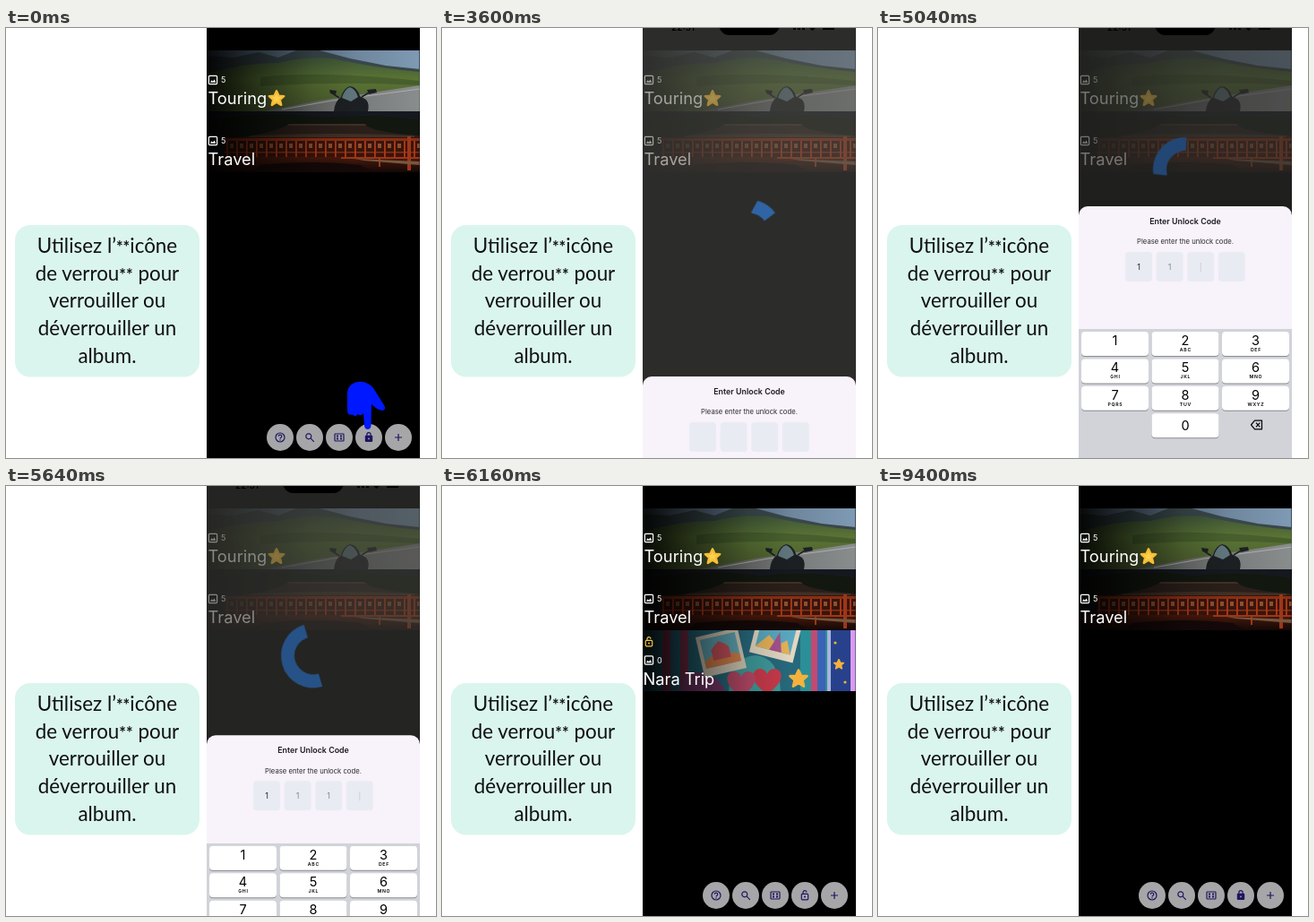
These frames come from a looping animation (480x480 px, 9880 ms). An HTML page:

```html
<!DOCTYPE html>
<html lang="fr">
<head>
<meta charset="utf-8">
<title>Verrouiller un album</title>
<style>
  html, body { margin: 0; width: 100%; height: 100%; overflow: hidden; background: #fff; }
  svg { display: block; width: 100%; height: 100%; }
  .say { font: 22.4px Lato, "Noto Sans", sans-serif; text-anchor: middle; fill: #111; }
  .say .stars { font-size: 18px; font-weight: 700; }
  .label { font: 18.3px Inter, sans-serif; fill: #fff; }
  .count { font: 9px Inter, sans-serif; fill: #fff; }
  .mid { text-anchor: middle; }
  .title { font: 600 8.9px Inter, sans-serif; fill: #1c1b20; }
  .hint { font: 7.7px Inter, sans-serif; fill: #2b2a30; }
  .digit { font: 9px Inter, sans-serif; }
  .num { font: 14.5px Inter, sans-serif; }
  .abc { font: 600 5.2px Inter, sans-serif; letter-spacing: .7px; }
  .clock { font: 600 10px Inter, sans-serif; }
  .line { fill: none; stroke: currentColor; stroke-width: 1.2; stroke-linejoin: round; }
  #hand { transform-origin: 402px 422px; }
  #nara, #loading, #barrier { opacity: 0; }
</style>
</head>
<body>
<svg viewBox="0 0 480 480">
  <defs>
    <clipPath id="screen"><path d="M224 0h238v480h-238z"/></clipPath>
    <clipPath id="strip"><path d="M0 0h237.5v68h-237.5z"/></clipPath>
    <linearGradient id="shade">
      <stop offset="0" stop-color="#000" stop-opacity=".92"/>
      <stop offset=".2" stop-color="#000" stop-opacity=".6"/>
      <stop offset=".5" stop-color="#000" stop-opacity=".15"/>
      <stop offset=".7" stop-color="#000" stop-opacity="0"/>
    </linearGradient>
    <linearGradient id="sky">
      <stop offset=".3" stop-color="#586c7e"/><stop offset="1" stop-color="#7f9ab4"/>
    </linearGradient>
    <linearGradient id="field" x2="0" y2="1">
      <stop offset="0" stop-color="#3f5638"/><stop offset=".4" stop-color="#5a7434"/><stop offset="1" stop-color="#4a5a2e"/>
    </linearGradient>
    <linearGradient id="road">
      <stop offset="0" stop-color="#5d605d"/><stop offset="1" stop-color="#8a8d8e"/>
    </linearGradient>
    <linearGradient id="water" x2="0" y2="1">
      <stop offset="0" stop-color="#4a1a0c"/><stop offset="1" stop-color="#120807"/>
    </linearGradient>
    <pattern id="posts" width="11" height="24" y="28" patternUnits="userSpaceOnUse">
      <path fill="#3a140b" d="M0 0h11v24h-11z"/>
      <path fill="#8a2f16" d="M0 2h11v3h-11zM0 17h11v1.5h-11z"/>
      <path fill="#ad3a18" d="M0 5h1.8v19h-1.8z"/>
      <path fill="#8c5130" d="M4 8h4v5h-4z"/>
    </pattern>
    <path id="star" d="M0 -8.2L2.5 -2.8L8.2 -2.4L3.8 1.6L5.2 7.4L0 4.3L-5.2 7.4L-3.8 1.6L-8.2 -2.4L-2.5 -2.8Z" stroke-width="2.4" stroke-linejoin="round"/>
    <path id="heart" d="M0 14C-22 0 -17 -14 -8 -14C-3 -14 0 -10 0 -7C0 -10 3 -14 8 -14C17 -14 22 0 0 14Z"/>
    <g id="photos" color="#fff">
      <rect class="line" x="-4.6" y="-4.6" width="9.2" height="9.2" rx="1"/>
      <path fill="currentColor" d="M-3.2 2.8L-1.3 .2L0 1.7L1.5 -.6L3.3 2.8Z"/>
    </g>
    <g id="unlocked">
      <rect class="line" x="-3.7" y="-1.6" width="7.4" height="6.4" rx="1"/>
      <path class="line" d="M-2 -1.8V-3.2A2 2 0 0 1 2 -3.4"/>
      <circle cy="1.6" r="1" fill="currentColor"/>
    </g>
    <g id="locked">
      <rect fill="currentColor" x="-4.2" y="-2.2" width="8.4" height="7.1" rx="1"/>
      <path class="line" d="M-2.1 -2V-3.3A2.1 2.1 0 0 1 2.1 -3.3V-2"/>
      <circle cy="1.4" r=".9" fill="#a6a6a8"/>
    </g>
  </defs>

  <rect x="10" y="220" width="206" height="169.5" rx="17" fill="#daf5ed"/>
  <g class="say">
    <text x="113" y="250.8">Utilisez l’<tspan class="stars">**</tspan>icône</text>
    <text x="113" y="281.6">de verrou<tspan class="stars">**</tspan> pour</text>
    <text x="113" y="312.3">verrouiller ou</text>
    <text x="113" y="343">déverrouiller un</text>
    <text x="113" y="373.7">album.</text>
  </g>

  <g clip-path="url(#screen)">
    <path d="M224 0h238v480h-238z"/>

    <g transform="translate(224 25)">
      <g clip-path="url(#strip)">
        <path fill="url(#sky)" d="M0 0h238v68h-238z"/>
        <path fill="#39474a" d="M0 6L30 8L58 2L80 8L100 0H126L160 9L200 17L238 21V40H0Z"/>
        <path fill="url(#field)" d="M0 26Q40 14 80 14Q112 6 140 9Q190 20 238 24V68H0Z"/>
        <path fill="#3c5229" d="M60 30Q120 22 238 34V39Q150 34 60 40Z" opacity=".6"/>
        <path fill="url(#road)" d="M62 68L126 56L238 39V68Z"/>
        <path stroke="#b9bab5" stroke-width=".8" fill="none" d="M84 66L140 56L238 43"/>
        <path fill="#1d2022" d="M142 68Q143 57 150 52Q153 42 160 40Q168 41 171 51L178 55Q182 60 180 68Z"/>
        <path fill="#60757d" d="M151 53Q154 43 160 41Q166 43 169 52L161 57Z"/>
        <path fill="none" stroke="#1d2022" stroke-width="1.6" d="M148 53L139 47M173 52L183 46"/>
        <path fill="#1d2022" d="M137 44l8 1l-1 4l-6 -1zM179 44l10 -1l1 4l-9 2z"/>
        <path fill="url(#shade)" d="M0 0h238v68h-238z"/>
      </g>
      <use href="#photos" x="7" y="33"/>
      <text class="count" x="16" y="36.3">5</text>
      <text class="label" x="1.5" y="60">Touring</text>
      <use href="#star" x="78" y="53.5" fill="#fdd04f" stroke="#f9bd35"/>
    </g>

    <g transform="translate(224 93)">
      <g clip-path="url(#strip)">
        <path fill="#15191f" d="M0 0h238v68h-238z"/>
        <path fill="#12170f" d="M0 10Q70 -2 130 7Q190 2 238 10V40H0Z"/>
        <path fill="#2a1f1a" d="M36 29Q70 25 92 15H176Q190 24 238 27V32H36Z"/>
        <path fill="#403025" d="M92 14h84l3 2h-90zM50 27Q140 23 232 27V29H46Z"/>
        <path fill="url(#posts)" d="M20 29H238V51H20Z"/>
        <path fill="url(#water)" d="M0 51H238V68H0Z"/>
        <path fill="#9c3717" d="M150 51H238V53H150ZM224 28h4v38h-4zM192 53h2v9h-2z"/>
        <path fill="#77573f" d="M165 53L238 56V60L176 55Z"/>
        <path fill="#140908" d="M60 60Q120 54 172 60L186 68H50Z"/>
        <path fill="url(#shade)" d="M0 0h238v68h-238z"/>
      </g>
      <use href="#photos" x="7" y="33"/>
      <text class="count" x="16" y="36.3">5</text>
      <text class="label" x="1.5" y="60">Travel</text>
    </g>

    <g id="nara"><g transform="translate(224 161)">
      <g clip-path="url(#strip)">
        <path fill="#27697c" d="M0 0h238v68h-238z"/>
        <path fill="#8a3350" d="M22 0h9v68h-9zM42 0h9v68h-9z"/>
        <path fill="#3f9a9b" d="M96 68Q98 30 126 28Q152 30 154 68Z"/>
        <path fill="#7a3a6c" d="M40 68Q46 42 68 48Q86 52 92 68Z"/>
        <path fill="#2b8f98" d="M176 0h34v68h-34z"/>
        <path fill="#c24a72" d="M188 0h7v68h-7z"/>
        <path fill="#3a63b5" d="M195 0h9v68h-9z"/>
        <path fill="#a9b4dc" d="M206 0h4v68h-4z"/>
        <path fill="#27418c" d="M210 0h22v68h-22z"/>
        <path fill="#d99af0" d="M232 0h6v68h-6z"/>
        <g transform="translate(87 23) rotate(-13)">
          <path fill="#d6cdb9" d="M-24 -21h48v46h-48z"/>
          <path fill="#62a9b7" d="M-20 -17h40v33h-40z"/>
          <path fill="#d9824a" d="M-20 16V8Q-8 0 2 7Q12 2 20 8V16Z"/>
          <path fill="#c9525c" d="M-10 9V-3L-6 -7L0 -11L6 -7L10 -3V9Z"/>
        </g>
        <g transform="translate(148 11) rotate(14)">
          <path fill="#e2d7c2" d="M-25 -24h50v44h-50z"/>
          <path fill="#5aa8bf" d="M-20 -20h40v32h-40z"/>
          <path fill="#e5b257" d="M-20 12L-8 -4L4 5L13 -3L20 12Z"/>
          <path fill="#a5538f" d="M-4 12L3 -10L10 12Z"/>
        </g>
        <use href="#heart" x="139" y="57" fill="#c93a4b"/>
        <use href="#heart" x="110" y="60" fill="#b84a68"/>
        <use href="#star" transform="translate(174 54) scale(1.15)" fill="#f4b23c" stroke="#f4b23c"/>
        <use href="#star" transform="translate(219 38) scale(.65)" fill="#f4b23c" stroke="#f4b23c"/>
        <circle cx="215" cy="14" r="1.6" fill="#f4b23c"/>
        <circle cx="226" cy="58" r="1.6" fill="#f4b23c"/>
        <path fill="url(#shade)" d="M0 0h238v68h-238z"/>
      </g>
      <use href="#unlocked" x="7" y="13" color="#f5c63c"/>
      <use href="#photos" x="7" y="33.5"/>
      <text class="count" x="16" y="36.8">0</text>
      <text class="label" x=".5" y="60.5">Nara Trip</text>
    </g></g>

    <g id="bar" color="#1d1560"></g>

    <g id="loading">
      <path fill="#fffff0" fill-opacity=".27" d="M224 0h238v480h-238z"/>
      <rect x="309" y="-16" width="68" height="24" rx="12"/>
      <text class="clock mid" x="269" y="2.5">22:51</text>
      <path d="M392 0h3v2h-3zM397 0h3v2h-3zM402 0h3v2h-3zM410 0h7l-3.5 3zM425 0h13v2h-13z"/>
      <g id="center">
        <circle id="arc" r="28.5" pathLength="360" fill="none" stroke="#4a9bff" stroke-width="15"/>
      </g>
    </g>
    <path id="barrier" d="M224 0h238v480h-238z"/>

    <g id="sheet">
      <rect x="224" width="238" height="320" rx="10" fill="#f8f2fa"/>
      <text class="title mid" x="343" y="20">Enter Unlock Code</text>
      <text class="hint mid" x="343" y="42.3">Please enter the unlock code.</text>
      <g id="code"></g>
    </g>
    <g id="keys"><path fill="#d1d3d9" d="M224 0h238v170h-238z"/></g>
  </g>

  <path id="hand" fill="#0018ff" d="M381 412Q380 401 387 397Q394 393 402 396Q409 399 412 405L422 421Q425 426 420 427Q415 427 408 420L407.5 444Q407 448 403.7 448Q400.5 448 400 444L399 430Q396 434 393 431Q390 435 387 431.5Q381 433 381 427Z"/>
</svg>

<script>
const LOOP = 9880;
const $ = id => document.getElementById(id);
const sheet = document.head.appendChild(document.createElement('style'));
const add = (id, markup) => $(id).insertAdjacentHTML('beforeend', markup);

// frames: [ms, declarations, easing to the next frame]
function track(id, frames) {
  const all = [[0, frames[0][1]], ...frames, [LOOP, frames.at(-1)[1]]];
  const body = all.map(([ms, css, ease = 'linear']) =>
    `${(ms / LOOP * 100).toFixed(3)}%{${css};animation-timing-function:${ease}}`).join('');
  sheet.append(`@keyframes ${id}-run{${body}}#${id}{animation:${id}-run ${LOOP}ms linear infinite}\n`);
}
const moveY = (id, frames, x = 0) =>
  track(id, frames.map(([ms, y, ease]) => [ms, `transform:translate(${x}px,${y}px)`, ease]));
const fade = (id, frames) =>
  track(id, frames.map(([ms, o, ease]) => [ms, `opacity:${o}`, ease]));
const during = (id, spans, on = 1) =>
  fade(id, spans.flatMap(([from, to]) => [[from - 10, 1 - on], [from - 9, on], [to - 10, on], [to - 9, 1 - on]]));

// Bottom buttons
const icons = [
  `<circle class="line" r="5"/><path class="line" d="M-1.7 -1.2A1.7 1.7 0 1 1 .9 .2Q0 .7 0 1.6"/><circle cy="3" r=".7" fill="currentColor"/>`,
  `<circle class="line" cx="-1.2" cy="-1.2" r="3"/><path class="line" d="M1.2 1.2L4.8 4.8"/>`,
  `<rect class="line" x="-5" y="-4" width="10" height="8" rx=".8"/><path fill="currentColor" d="M-3 -2.5h2v2h-2zM1 -2.5h2v2h-2zM-3 .6h2v2h-2zM1 .6h2v2h-2z"/>`,
  `<g id="shut"><use href="#locked"/></g><g id="open"><use href="#unlocked"/></g>`,
  `<path class="line" d="M-4 0H4M0 -4V4"/>`
];
icons.forEach((icon, i) =>
  add('bar', `<g transform="translate(${306 + 33 * i} 457)"><circle r="15" fill="#a6a6a8"/>${icon}</g>`));

// Code boxes and number pad
const typed = [3960, 4560, 4860, 5160, 5860];
for (let i = 0; i < 4; i++) {
  const x = 276 + 34.6 * i;
  add('code', `<rect x="${x}" y="51" width="30" height="33" rx="4" fill="#e9ebf3"/>
    <path id="caret${i}" d="M${x + 15} 63v10" stroke="#cdcfdc"/>`);
  during('caret' + i, [[typed[i], typed[i + 1]]]);
  if (i < 3) {
    add('code', `<text id="digit${i}" class="digit mid" x="${x + 15}" y="70.5" fill="${i ? '#85868e' : '#22232c'}">1</text>`);
    during('digit' + i, [[typed[i + 1], 5960]]);
  }
}
const letters = ['', 'ABC', 'DEF', 'GHI', 'JKL', 'MNO', 'PQRS', 'TUV', 'WXYZ'];
function key(col, row, num, abc = '') {
  const x = 227 + 78.5 * col, y = 3 + 30.4 * row, cx = x + 37.5;
  add('keys', `<rect x="${x}" y="${y + 1}" width="75" height="27" rx="4" fill="#898b90"/>
    <rect x="${x}" y="${y}" width="75" height="27" rx="4" fill="#fff"/>
    ${num === 1 ? `<rect id="press" x="${x}" y="${y}" width="75" height="27" rx="4" fill="#b4b8c2"/>` : ''}
    <text class="num mid" x="${cx}" y="${y + (num ? 15 : 18.5)}">${num}</text>
    <text class="abc mid" x="${cx + .4}" y="${y + 22}">${abc}</text>`);
}
letters.forEach((abc, i) => key(i % 3, Math.floor(i / 3), i + 1, abc));
key(1, 3, 0);
add('keys', `<path class="line" d="M416.5 107l4 -4.8h8v9.6h-8zM422 104.7l4.4 4.6M426.4 104.7l-4.4 4.6"/>`);

// Motion
track('hand', [
  [490, 'opacity:1;transform:scale(1)', 'ease-out'],
  [1430, 'opacity:0;transform:scale(1.17)']
]);
during('press', [[4480, 4580], [4780, 4880], [5080, 5180], [5360, 5460]]);
during('open', [[6140, 7810]]);
during('shut', [[6140, 7810]], 0);
fade('nara', [[6130, 0], [6131, 1], [7780, 1], [8230, 0]]);
fade('loading', [[3380, 0], [3500, 1], [6040, 1], [6150, 0]]);
fade('barrier', [[3460, 0], [3600, .35], [3720, .54], [5540, .54], [5640, .47], [5800, 0]]);
moveY('sheet', [[3460, 500], [3600, 390], [3700, 300, 'ease-out'], [3960, 199],
  [5540, 199, 'ease-in'], [5640, 277], [5820, 500]]);
moveY('keys', [[3560, 500], [3600, 482, 'ease-out'], [3960, 336],
  [5540, 336, 'ease-in'], [5640, 398, 'ease-out'], [5840, 500]]);
moveY('center', [[3540, 238], [3600, 228, 'ease-out'], [3960, 158],
  [5540, 158, 'ease-in'], [5640, 189, 'ease-out'], [5840, 238]], 343);
track('arc', [
  [3440, -115, 4], [3600, -79, 42], [4120, 37, 285], [4800, 473, 4],
  [5466, 626, 280], [5640, 793, 180], [6120, 1073, 8]
].map(([ms, start, sweep]) =>
  [ms, `transform:rotate(${start}deg);stroke-dasharray:${sweep} ${360 - sweep}`]));
</script>
</body>
</html>
```
